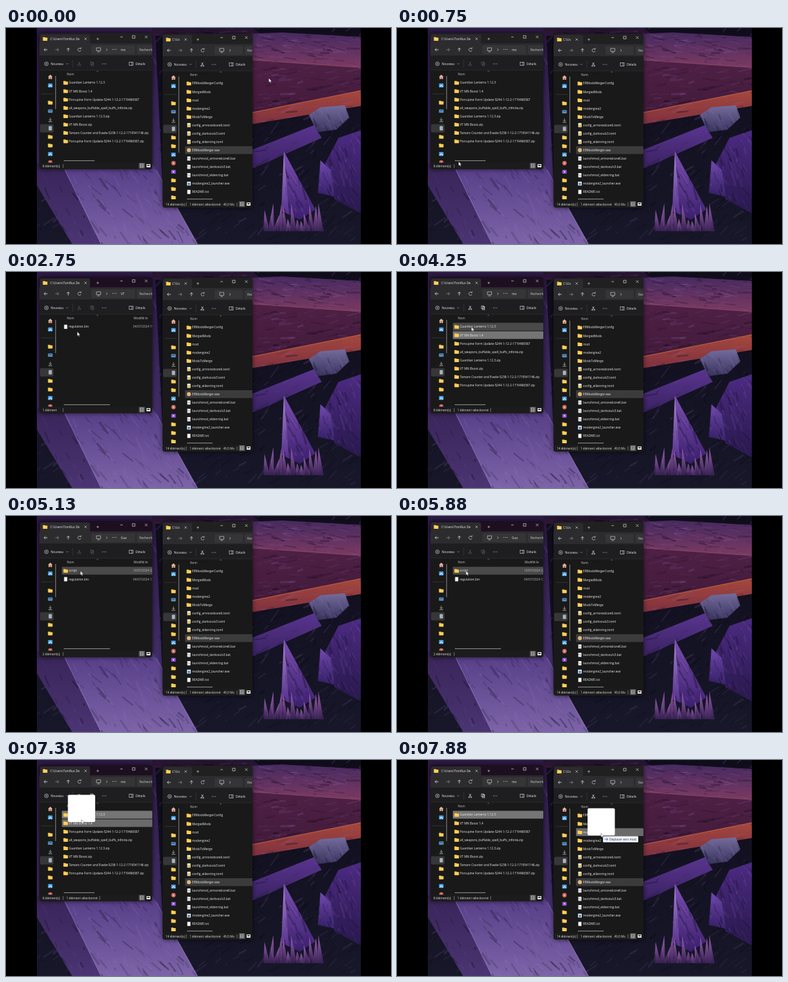
Recreate the animation shown at these times as an HTML page with a canvas. Size 600x338 px, loop 8000 ms.

```html
<!DOCTYPE html>
<html lang="fr">
<head>
<meta charset="utf-8">
<title>Explorateur</title>
<style>
html, body { margin: 0; width: 100%; height: 100%; overflow: hidden; background: #000; }
canvas { display: block; }
</style>
</head>
<body>
<canvas id="stage" width="600" height="338"></canvas>
<script>
const LOOP = 8000, STEP = 125, ROW = 13.05;
const stage = document.getElementById('stage').getContext('2d');
let g = stage;

let seed = 7;
const rnd = () => (seed = seed * 16807 % 2147483647) / 2147483647;

// ---- drawing helpers ----
function box(x, y, w, h, color, r = 0) {
  g.fillStyle = color;
  g.beginPath();
  g.roundRect(x, y, w, h, r);
  g.fill();
}
function disc(x, y, r, color) {
  g.fillStyle = color;
  g.beginPath();
  g.arc(x, y, r, 0, 7);
  g.fill();
}
function trace(p) {
  g.beginPath();
  for (let i = 0; i < p.length; i += 2) g.lineTo(p[i], p[i + 1]);
}
function line(color, width, ...p) {
  trace(p);
  g.strokeStyle = color;
  g.lineWidth = width;
  g.stroke();
}
// Laid out at four times the size so that tiny glyphs keep their spacing.
function text(s, x, y, color = '#eee', size = 4.75) {
  g.save();
  g.translate(x, y);
  g.scale(.25, .25);
  g.font = `${size * 4}px "Open Sans", "Noto Sans", sans-serif`;
  g.textBaseline = 'alphabetic';
  g.fillStyle = color;
  g.fillText(s, 0, size * 1.4);
  g.restore();
}
function clipped(x, y, w, h, draw) {
  g.save();
  g.beginPath();
  g.rect(x, y, w, h);
  g.clip();
  draw();
  g.restore();
}

// ---- wallpaper ----
function facet(p, top, bottom, strokes = 0, angle = 0) {
  const xs = p.filter((_, i) => i % 2 < 1), ys = p.filter((_, i) => i % 2);
  const x0 = Math.min(...xs), x1 = Math.max(...xs), y0 = Math.min(...ys), y1 = Math.max(...ys);
  const fill = g.createLinearGradient(0, y0, 0, y1);
  fill.addColorStop(0, top);
  fill.addColorStop(1, bottom);
  g.save();
  trace(p);
  g.clip();
  g.fillStyle = fill;
  g.fillRect(x0, y0, x1 - x0, y1 - y0);
  for (let i = 0; i < strokes; i++) {
    const x = x0 + rnd() * (x1 - x0), y = y0 + rnd() * (y1 - y0);
    const a = angle + rnd() * .5 - .25, n = 4 + rnd() * 20;
    const color = rnd() < .5 ? `rgba(8,6,20,${rnd() * .3})` : `rgba(165,120,205,${rnd() * .17})`;
    line(color, .6 + rnd() * 2.5, x, y, x + n * Math.cos(a), y + n * Math.sin(a));
  }
  g.restore();
}
function paintWallpaper() {
  facet([48, 0, 553, 0, 553, 338, 48, 338], '#100d1b', '#171729', 900, -.7);
  facet([48, 0, 232, 0, 246, 285, 48, 230], '#2c1a44', '#4a3474', 90, .9);
  facet([228, 0, 385, 0, 400, 12, 228, 12], '#24142f', '#331a3c', 40, .1);
  // large red beam
  facet([380, 9, 430, 7, 553, 14, 553, 62, 380, 50], '#472a60', '#7b3a62', 160, .1);
  facet([380, 50, 553, 62, 553, 100, 380, 133], '#4e2045', '#431b3b', 140, -.1);
  facet([380, 133, 553, 98, 553, 122, 380, 151], '#a5483d', '#7e3040', 60, -.2);
  line('#c3623f', 1.2, 380, 133, 553, 98);
  line('#8d4a62', 1, 385, 50, 553, 62);
  // crystals on the right
  facet([380, 192, 480, 152, 492, 172, 380, 222], '#5a3590', '#38215f', 60, -.4);
  facet([472, 136, 490, 124, 528, 121, 535, 140, 515, 159, 485, 163], '#746c9c', '#37325c', 40, 1);
  facet([496, 215, 518, 172, 553, 160, 553, 290, 512, 268], '#4c2b82', '#28184c', 120, 1.1);
  facet([486, 258, 490, 207, 506, 222, 513, 264], '#7049ae', '#331e64', 25, 1.3);
  facet([433, 193, 482, 284, 458, 300, 438, 290], '#7b4fb2', '#3a1f6c', 50, 1.1);
  facet([433, 193, 441, 292, 429, 286], '#a886cf', '#54308a', 10, 1.4);
  for (let i = 0; i < 13; i++) {
    const x = 406 + i * 7, h = 16 + rnd() * 28, lean = rnd() * 12 - 6;
    facet([x - 5, 318, x + lean, 318 - h, x + 5, 318], '#9a5fb0', '#35204f', 6, 1.4);
  }
  // big crystal lower left
  facet([48, 212, 95, 212, 152, 338, 103, 338, 48, 246], '#392559', '#4a3472', 50, 1.1);
  facet([86, 212, 228, 212, 299, 338, 148, 338], '#553d86', '#7d64a8', 220, .9);
  line('#9079b8', .8, 92, 222, 148, 338);
  line('#9079b8', .8, 234, 222, 298, 338);
}
const wallpaper = document.createElement('canvas');
wallpaper.width = 600;
wallpaper.height = 338;
g = wallpaper.getContext('2d');
clipped(48, 0, 505, 338, paintWallpaper);
g = stage;

// ---- icons, centred on x, y ----
const icons = {
  folder(x, y) {
    box(x - 3.5, y - 3, 3.5, 2, '#d99a2b', .5);
    box(x - 3.5, y - 2, 7, 5, '#ffd05a', .6);
  },
  doc(x, y) { box(x - 2.5, y - 3.3, 5, 6.6, '#f2f2f2', .4); },
  toml(x, y) {
    icons.doc(x, y);
    box(x - 1.5, y - 1, 4.5, 3.6, '#d9c04a', .5);
  },
  bat(x, y) {
    icons.doc(x, y);
    line('#6b5f9c', .8, x - 1.6, y - 1, x + 1.6, y + 1.2);
  },
  merger(x, y) { disc(x, y, 3.1, '#dcb878'); },
  exe(x, y) {
    box(x - 3, y - 3, 6, 6, '#e6eef8', .5);
    box(x - 2, y - 1, 4, 3, '#4a7fc0');
  },
  home(x, y) {
    trace([x - 3.6, y, x, y - 3.6, x + 3.6, y, x + 2.6, y, x + 2.6, y + 3.4, x - 2.6, y + 3.4, x - 2.6, y]);
    g.fillStyle = '#e6b3a0';
    g.fill();
    box(x - .8, y + .8, 1.6, 2.6, '#a4583f');
  },
  picture(x, y) {
    box(x - 3.5, y - 3.2, 7, 6.4, '#4ba0e6', 1);
    line('#d8efff', 1.3, x - 2.5, y + 2, x, y - .5, x + 2.5, y + 2);
  },
  drive(x, y) {
    box(x - 3.5, y - 2.6, 7, 5, '#6d9fd0', .6);
    box(x - 2.5, y - 1.6, 5, 2, '#2f669f');
  },
  down(x, y) {
    line('#bbb', .8, x, y - 3, x, y + 1.5);
    line('#bbb', .8, x - 2, y - .3, x, y + 1.7, x + 2, y - .3);
    line('#bbb', .8, x - 3, y + 3.2, x + 3, y + 3.2);
  },
  paper(x, y) { box(x - 2.5, y - 3.3, 5, 6.6, '#a9b3bf', .5); },
  music(x, y) { disc(x, y, 3.4, '#d36a62'); disc(x, y, 1, '#ffe3dd'); },
  video(x, y) { box(x - 3.4, y - 3, 6.8, 6, '#8d55d6', 1); disc(x, y, 1, '#fff'); },
};
const sideIcons = 'home picture - folder drive down paper folder folder picture music video folder folder folder'.split(' ');

const dots = (x, y) => [-2.6, 0, 2.6].forEach(d => disc(x + d, y, .6, '#ddd'));
const cross = (x, y, r = 1.7) => {
  line('#ccc', .7, x - r, y - r, x + r, y + r);
  line('#ccc', .7, x - r, y + r, x + r, y - r);
};
const plus = (x, y, r = 1.8) => {
  line('#ccc', .7, x - r, y, x + r, y);
  line('#ccc', .7, x, y - r, x, y + r);
};
function ring(x, y, r, a0 = 0, a1 = 7, color = '#ccc') {
  g.beginPath();
  g.arc(x, y, r, a0, a1);
  g.strokeStyle = color;
  g.lineWidth = .7;
  g.stroke();
}
function arrow(x, y, turn, color) {
  g.save();
  g.translate(x, y);
  g.rotate(turn);
  line(color, .8, -2.7, 0, 2.7, 0);
  line(color, .8, -.3, -2.2, -2.7, 0, -.3, 2.2);
  g.restore();
}
function scissors(x, y, color) {
  line(color, .7, x - 1.5, y - 3, x + 1.4, y + 1.4);
  line(color, .7, x + 1.5, y - 3, x - 1.4, y + 1.4);
  ring(x - 1.6, y + 2.2, .9, 0, 7, color);
  ring(x + 1.6, y + 2.2, .9, 0, 7, color);
}

// ---- explorer window ----
const rowAt = (w, x, y) => {
  const i = Math.floor((y - w.y - 77.8 + ROW / 2) / ROW);
  return x > w.x + 34 && x < w.x + w.w && i >= 0 && i < w.rows.length ? i : -1;
};
function drawWindow(o) {
  const { w, h } = o;
  g.save();
  g.translate(o.x, o.y);
  g.shadowColor = '#000a';
  g.shadowBlur = 7;
  box(0, 0, w, h, '#191919', 4);
  g.shadowBlur = 0;
  g.beginPath();
  g.roundRect(0, 0, w, h, 4);
  g.clip();

  // title and tab
  box(0, 0, w, 17, o.active ? '#1d0f20' : '#202021');
  box(1, 2, o.tab, 18, '#2c2b2e', 3);
  icons.folder(9, 9);
  text(o.title, o.titleX, 9);
  cross(o.closeX, 9);
  plus(o.plusX, 9);
  line('#ddd', .7, w - 50, 6, w - 46, 6);
  g.strokeStyle = '#ddd';
  g.strokeRect(w - 31, 4, 4, 4);
  cross(w - 9.5, 6, 2);

  // navigation
  box(0, 16, w, 19, '#2c2b2e');
  box(81, 19, o.addrEnd - 81, 14, '#353437', 2);
  box(o.addrEnd + 3, 19, 60, 14, '#353437', 2);
  arrow(10, 26, 0, '#ddd');
  arrow(27.5, 26, Math.PI, '#888');
  arrow(45, 26, Math.PI / 2, '#ddd');
  ring(62.5, 26, 2.5, .3, 5.6);
  line('#ccc', .7, 62.8, 24.1, 65, 24.3, 65, 22.2);
  g.strokeRect(89, 23, 6.4, 4.6);
  line('#ccc', .8, 90.5, 29.3, 94, 29.3);
  line('#ccc', .7, 104.3, 24.3, 106, 26, 104.3, 27.7);
  if (o.addr) {
    dots(117, 25.5);
    clipped(120, 18, 16, 16, () => text(o.addr, 127, 26));
  }
  text('Rechercher', o.addrEnd + 7, 26, '#ccc');

  // commands
  box(0, 35, w, 23, '#1e1d1f');
  line('#333', .6, 0, 58, w, 58);
  ring(11, 48, 2.9);
  plus(11, 48, 1.4);
  text('Nouveau', 17.7, 48);
  line('#aaa', .7, 42, 47.3, 43.5, 48.8, 45, 47.3);
  line('#444', .6, 52, 42, 52, 54);
  const tool = o.picked ? '#ddd' : '#555';
  scissors(62, 48, tool);
  if (o.copy) {
    g.strokeStyle = tool;
    g.strokeRect(79.7, 45, 3.6, 4.6);
    g.strokeRect(81.3, 46.6, 3.4, 4.4);
  }
  dots(o.copy ? 101 : 80, 48);
  g.strokeStyle = '#ccc';
  g.strokeRect(w - 36, 45.6, 6, 4.8);
  line('#ccc', .7, w - 32, 45.6, w - 32, 50.4);
  text('Détails', w - 26, 48);

  // sidebar
  clipped(0, 59, 25, h - 69, () => {
    box(1, 142.5, 21, 13, '#373737', 2);
    sideIcons.forEach((name, i) => {
      const y = 68.5 + i * 13.4;
      if (name === '-') line('#444', .6, 3, 95, 22, 95);
      else icons[name](17, y);
    });
  });
  line('#999', .9, 25.3, 67, 25.3, o.barEnd);

  // file list
  text('Nom', 43, 64.5, '#ccc');
  line('#999', .6, 89, 60.5, 90.5, 59.3, 92, 60.5);
  if (o.dated) text('Modifié le', 147, 64.5, '#ccc');
  o.rows.forEach(([icon, name, date], i) => {
    const y = 77.8 + i * ROW, shade = o.shades[i];
    if (shade) box(35, y - 6.2, w - 35, 12.2, shade, 1);
    icons[icon](41, y);
    text(name, 46, y);
    if (date) text(date, 146, y, '#bbb');
  });
  line('#999', 1, 38, h - 13.3, o.scrollEnd, h - 13.3);

  // status
  box(0, h - 10.5, w, 11, '#1c1c1c');
  text(o.rows.length + (o.rows.length > 1 ? ' élément(s)' : ' élément'), 5, h - 5, '#ddd');
  line('#aaa', .6, 37, h - 8, 37, h - 2);
  if (o.status) {
    text(o.status, 42, h - 5, '#ddd');
    const end = o.copy ? 94 : 116;
    line('#aaa', .6, end, h - 8, end, h - 2);
  }
  box(w - 21, h - 10, 9.5, 9, '#555', 1);
  g.strokeStyle = '#eee';
  g.strokeRect(w - 18.5, h - 8, 4.4, 4.8);
  line('#eee', .6, w - 17.5, h - 5.5, w - 15, h - 5.5);
  box(w - 9, h - 8, 6, 5, '#eee', .5);
  box(w - 7.8, h - 7, 3.6, 2, '#445');
  g.restore();
}

// ---- content ----
const dir = name => ['folder', name];
const views = {
  mo: [
    'Guardian Lanterns 1.12.3', 'VT MN Boost 1.4', 'Porcupine Form Update-5244-1-12-2-1719486587',
    'all_weapons_buffable_spell_buffs_infinite.zip', 'Guardian Lanterns 1.12.3.zip', 'VT MN Boost.zip',
    'Tamaro Counter and Evade-5238-1-12-2-1719541146.zip', 'Porcupine Form Update-5244-1-12-2-1719486587.zip',
  ].map(dir),
  VT: [['doc', 'regulation.bin', '04/07/2024 19:10']],
  Guar: [['folder', 'script', '10/07/2024 22:40'], ['doc', 'regulation.bin', '04/07/2024 12:30']],
};
const gameRows = [
  ...['ERModsMergerConfig', 'MergedMods', 'mod', 'modengine2', 'ModsToMerge'].map(dir),
  ...['armoredcore6', 'darksouls3', 'eldenring'].map(n => ['toml', `config_${n}.toml`]),
  ['merger', 'ERModsMerger.exe'],
  ...['armoredcore6', 'darksouls3', 'eldenring'].map(n => ['bat', `launchmod_${n}.bat`]),
  ['exe', 'modengine2_launcher.exe'], ['doc', 'README.txt'],
];
const left = {
  x: 52, y: 8, w: 176, h: 213, tab: 78, title: 'C:\\Users\\TomRux De', titleX: 17, closeX: 72,
  plusX: 91, addrEnd: 149, copy: true, barEnd: 119,
};
const right = {
  x: 244, y: 9, w: 140, h: 272, tab: 45, title: 'C:\\Us', titleX: 15, closeX: 36, plusX: 55,
  addrEnd: 125, barEnd: 186, rows: gameRows, picked: true, scrollEnd: 78,
  status: '1 élément sélectionné   49,0 Mo',
};

// time, x, y of the pointer tip
const path = [
  [0, 409.5, 78.5], [750, 96, 209], [875, 96, 209], [1750, 112, 99], [2000, 111, 97], [2375, 111, 93.5],
  [2750, 111, 93.5], [3125, 63, 34], [3500, 62, 33], [4125, 115, 87], [4250, 116, 86], [5375, 116, 86],
  [5875, 107.5, 86], [6375, 63, 34], [6500, 62, 33], [7125, 114, 84], [7250, 114, 84],
  [7375, 117.5, 93.5], [7875, 318, 114.5], [8000, 318, 114.5],
];
function pointerAt(t) {
  const i = path.findIndex(p => p[0] > t);
  const [t0, x0, y0] = path[i - 1], [t1, x1, y1] = path[i];
  const u = (t - t0) / (t1 - t0), k = u * u * (3 - 2 * u);
  return [x0 + (x1 - x0) * k, y0 + (y1 - y0) * k];
}

function drawPointer(x, y) {
  trace([x, y, x, y + 6.4, x + 1.5, y + 5.2, x + 2.6, y + 7.5, x + 3.6, y + 7, x + 2.6, y + 4.8, x + 4.6, y + 4.7]);
  g.closePath();
  g.fillStyle = '#fff';
  g.fill();
  g.strokeStyle = '#222';
  g.lineWidth = .4;
  g.stroke();
}

function draw(t) {
  const [x, y] = pointerAt(t);
  const drag = t >= 7375;
  const view = t >= 2375 && t < 3500 ? 'VT' : t >= 5125 && t < 6500 ? 'Guar' : 'mo';
  const inList = view === 'mo';
  const picked = !inList || t < 2125 ? -1 : t < 4900 ? 1 : 0;
  const chosen = '#757575', hovered = '#4a4a4a';

  Object.assign(left, {
    rows: views[view], addr: view, dated: !inList, active: t >= 2000, picked: picked >= 0,
    status: picked >= 0 ? '1 élément sélectionné' : '', scrollEnd: inList ? 86 : 110, shades: {},
  });
  right.shades = { 8: '#3b3b3b' };
  for (const win of [left, right]) {
    const i = rowAt(win, x, y);
    if (i >= 0 && win.rows[i][0] === 'folder') win.shades[i] = drag ? '#6a6a6a' : hovered;
    else if (i >= 0 && !drag) win.shades[i] = hovered;
  }
  if (picked >= 0) left.shades[picked] = chosen;

  g.fillStyle = '#000';
  g.fillRect(0, 0, 600, 338);
  g.drawImage(wallpaper, 0, 0);
  drawWindow(left);
  drawWindow(right);

  if (drag) {
    box(x - 21, y - 39, 42.5, 42.5, '#fff', 2);
    const target = right.rows[rowAt(right, x, y)];
    if (target && target[0] === 'folder') {
      box(x + 3, y + 4.8, 55, 9.4, '#f1f1f7', 1);
      arrow(x + 8, y + 9.5, Math.PI, '#2a58b8');
      text('Déplacer vers ' + target[1], x + 13, y + 9.4, '#23305f');
    }
  }
  drawPointer(x, y);
}

function tick() {
  const t = performance.now() % LOOP;
  draw(Math.floor(t / STEP) * STEP);
  requestAnimationFrame(tick);
}
tick();
</script>
</body>
</html>
```
